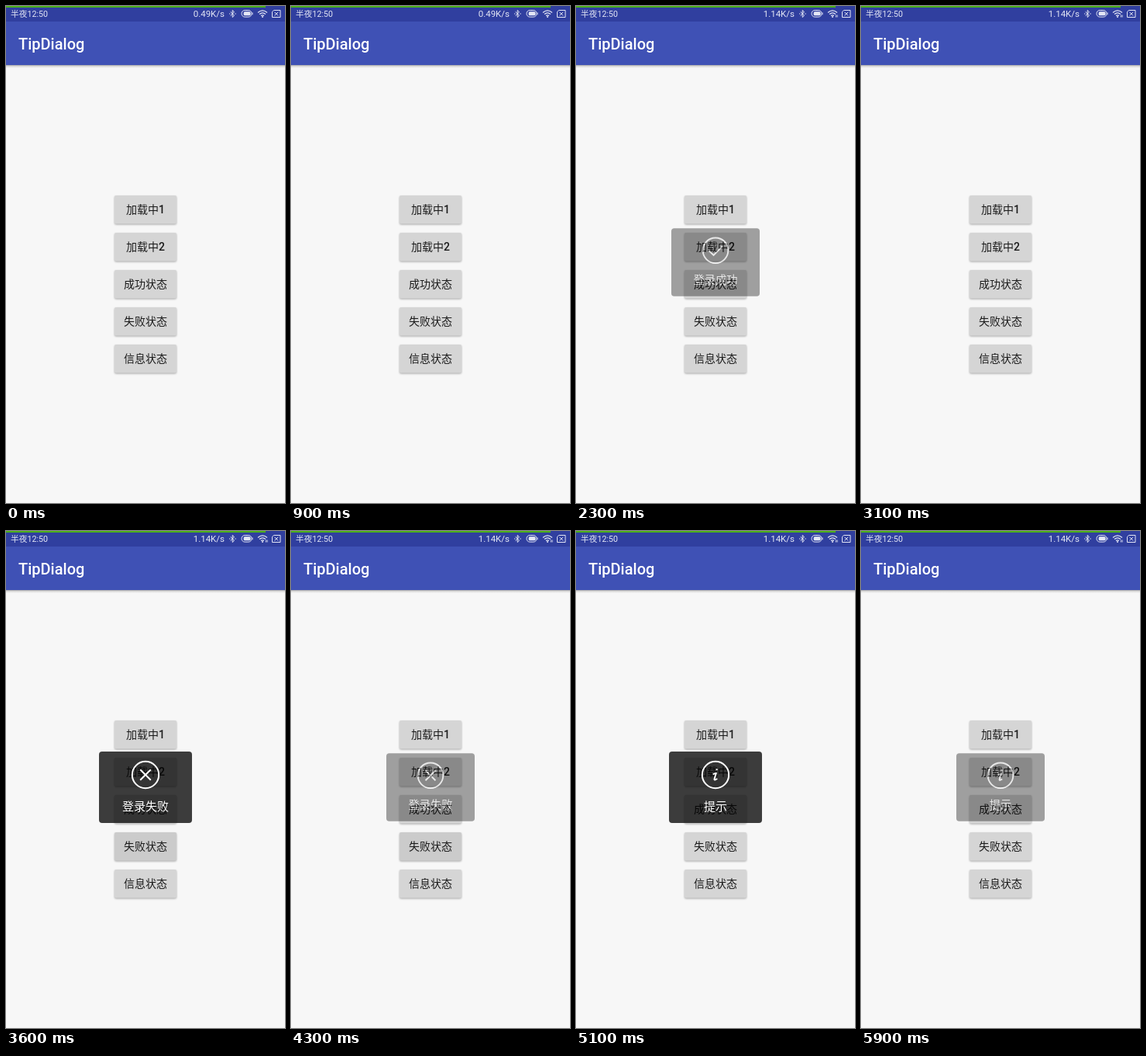
Animation of 360x640 px, one loop 6 s. Source, as an HTML page:

```html
<!DOCTYPE html>
<html lang="zh">
<head>
<meta charset="utf-8">
<title>TipDialog</title>
<style>
html, body { margin: 0; width: 100%; height: 100%; overflow: hidden; background: #f7f7f7; }
svg { display: block; width: 100%; height: 100%; }
text { font-family: Roboto, "Noto Sans CJK SC", "Noto Sans CJK", sans-serif; }
.medium { font-weight: 500; }
.status { fill: #e3e6f5; }
.line { fill: none; stroke: #e3e6f5; }
.button { filter: drop-shadow(0 1px 1px rgba(0, 0, 0, .32)); }
.button.raised { filter: drop-shadow(0 1.5px 1.6px rgba(0, 0, 0, .38)); }
.label { font-size: 14px; fill: #1b1b1b; text-anchor: middle; }
.message { font-size: 15px; fill: #fff; text-anchor: middle; }
.icon { fill: none; stroke: #fff; stroke-width: 2; }
</style>
</head>
<body>
<svg viewBox="0 0 360 640">
  <defs>
    <linearGradient id="shade" x2="0" y2="1">
      <stop offset="0" stop-opacity=".34"/>
      <stop offset=".4" stop-opacity=".12"/>
      <stop offset="1" stop-opacity="0"/>
    </linearGradient>
  </defs>
  <rect width="360" height="640" fill="#f7f7f7"/>
  <rect y="76" width="360" height="4" fill="url(#shade)"/>
  <rect width="360" height="76" fill="#3f51b5"/>
  <rect width="360" height="20" fill="#303f9f"/>
  <rect width="335" height="2" fill="#4cb01c"/>
  <text class="status" x="6" y="14" font-size="10.7">半夜12:50</text>
  <text class="status" id="speed" x="282" y="14" font-size="11.5" text-anchor="end"></text>

  <!-- bluetooth, battery, wifi, no SIM -->
  <path class="line" d="M289.6 7.4l5 4.8-2.4 2.3v-9l2.4 2.3-5 4.8"/>
  <path class="line" d="M288 10h1.4M295.4 10h1.4" stroke-width="1.2"/>
  <rect class="line" x="304" y="5.5" width="13" height="8.6" rx="4.2"/>
  <rect class="status" x="306.6" y="7.3" width="9" height="5" rx="1.6"/>
  <path class="line" d="M318 8.4v2.8"/>
  <g class="line" stroke-width="1.3">
    <path d="M325 8.4q6-5 12 0"/>
    <path d="M327 10.6q4-3.4 8 0"/>
    <path d="M329 12.6q2-1.6 4 0"/>
  </g>
  <circle class="status" cx="331" cy="14" r="1"/>
  <path class="line" id="traffic" d="M335.5 11.5v3M337.2 11.5v3" stroke-width=".9"/>
  <path class="line" d="M345.5 5.5h8.5v9h-10.5v-7zM346.5 7.8l4.6 4.6M351.1 7.8l-4.6 4.6"/>

  <text class="medium" x="16" y="55.5" font-size="20" fill="#fff">TipDialog</text>
  <g id="buttons"></g>
  <g id="dialog">
    <rect x="120" y="284" width="120" height="92" rx="4" fill="#000" fill-opacity=".755"/>
    <circle class="icon" cx="180" cy="314" r="17.2"/>
    <path class="icon" id="mark" stroke-width="2"/>
    <text class="message" id="message" x="180" y="360"></text>
  </g>
</svg>
<script>
const LOOP = 6000, STEP = 100;
const CHECK = "M171 314.2l6.4 6.3 12-12.2";
const CROSS = "M173.2 307.2l13.6 13.6M186.8 307.2l-13.6 13.6";
const INFO = "M181.4 306.2l.4 1.9M176.8 313.6q2.4-2 3.9-1.6l-2.2 7.6q-.2 2 3.8-.6";
const LABELS = [["加载中", "1"], ["加载中", "2"], ["成功状态"], ["失败状态"], ["信息状态"]];
const TIPS = [
  { button: 2, show: 1400, release: 1500, mark: CHECK, text: "登录成功" },
  { button: 3, show: 3400, release: 4800, mark: CROSS, text: "登录失败" },
  { button: 4, show: 5000, release: 5100, mark: INFO, text: "提示" }
];
const VISIBLE = 900, PRESS = 200;

const get = id => document.getElementById(id);
const speed = get("speed"), traffic = get("traffic"), dialog = get("dialog");
const mark = get("mark"), message = get("message");

get("buttons").innerHTML = LABELS.map(([name, digit = ""], i) => {
  const y = 244 + 48 * i;
  return `<rect class="button" x="140" y="${y}" width="80" height="36.5" rx="2"/>
    <text class="label" x="180" y="${y + 23.4}">${name}<tspan class="medium">${digit}</tspan></text>`;
}).join("");
const buttons = document.querySelectorAll(".button");

function paintButton(el, i, t) {
  const tip = TIPS.find(p => p.button === i && t >= p.show - PRESS && t < p.release);
  const held = Boolean(tip) && t < tip.show;
  el.setAttribute("fill", !tip ? "#d5d5d5" : held ? "#d0d3d3" : "#cbcbcb");
  el.classList.toggle("raised", held);
}

function paintDialog(t) {
  const tip = TIPS.find(p => t >= p.show && t < p.show + VISIBLE + STEP);
  dialog.style.display = tip ? "" : "none";
  if (!tip) return;
  const age = t - tip.show;
  const moving = age < STEP || age >= VISIBLE;
  const scale = moving ? 0.95 : 1;
  dialog.setAttribute("opacity", moving ? 0.47 : 1);
  dialog.setAttribute("transform", `translate(180 330) scale(${scale}) translate(-180 -330)`);
  mark.setAttribute("d", tip.mark);
  message.textContent = tip.text;
}

function draw(time) {
  const t = Math.floor(time % LOOP / STEP) * STEP;
  const later = t >= 2300;
  speed.textContent = later ? "1.14K/s" : "0.49K/s";
  traffic.style.display = later ? "" : "none";
  buttons.forEach((el, i) => paintButton(el, i, t));
  paintDialog(t);
}

const start = performance.now();
function tick() {
  draw(performance.now() - start);
  requestAnimationFrame(tick);
}
tick();
</script>
</body>
</html>
```
